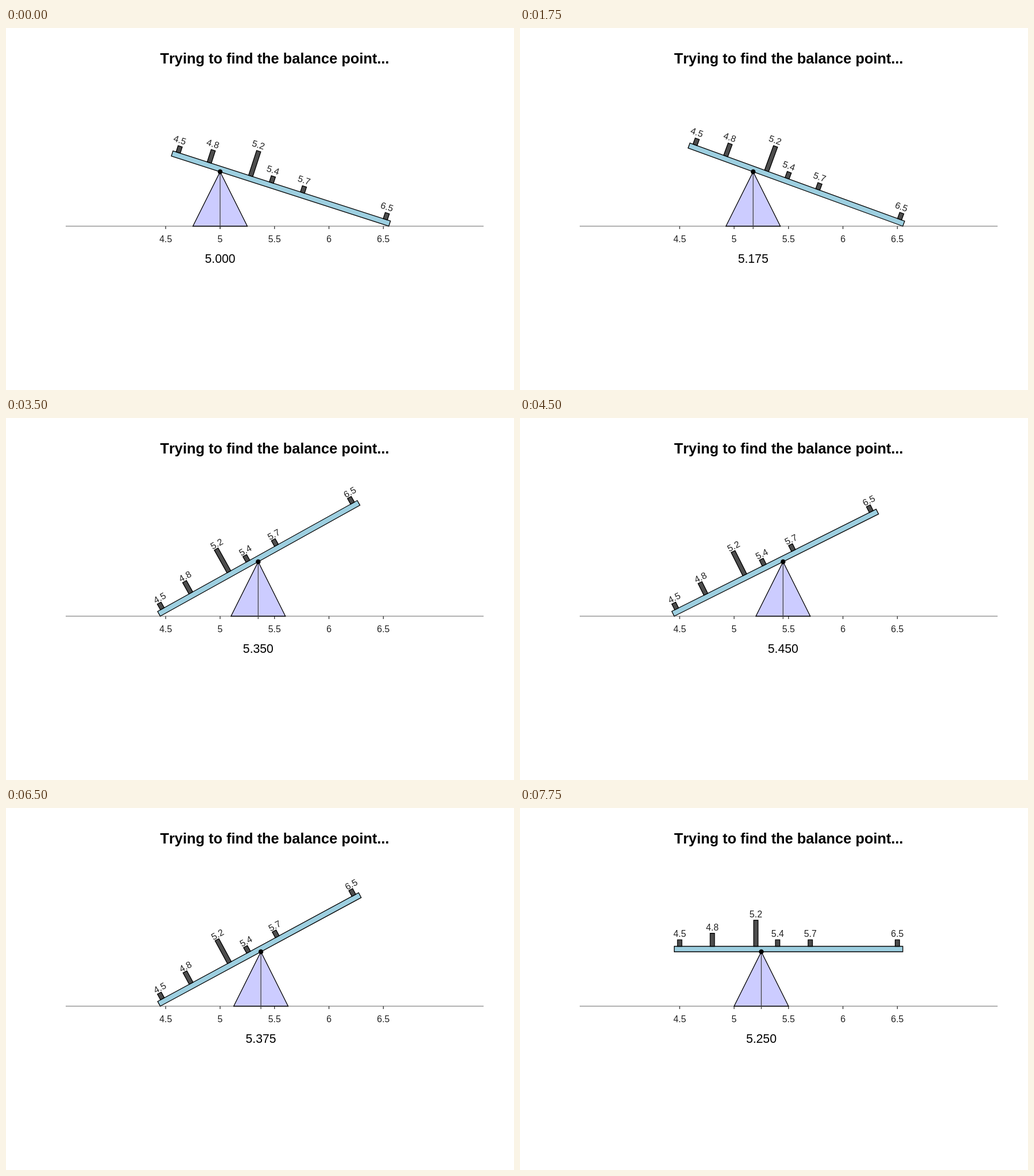
Animation, 885 px wide and 632 px high, one loop 8000 ms. Source, as an HTML page with a canvas:

```html
<!DOCTYPE html>
<html>
<head>
<meta charset="utf-8">
<style>
html, body { margin: 0; width: 100%; height: 100%; overflow: hidden; background: #fff; }
canvas { display: block; }
</style>
</head>
<body>
<canvas id="stage" width="885" height="632"></canvas>
<script>
const ctx = document.getElementById('stage').getContext('2d');
const UNIT = 189.6, GROUND = 346, APEX = 251, MEAN = 5.25;
const LEFT = 4.45, RIGHT = 6.55, THICK = 0.05 * UNIT;
const weights = [[4.5, 1], [4.8, 2], [5.2, 4], [5.4, 1], [5.7, 1], [6.5, 1]];
const STEP = 250, LOOP = 8000;
const px = v => 373 + (v - 5) * UNIT;

function text(str, x, y, size, color = '#000', weight = '') {
  ctx.font = `${weight} ${size}px "Liberation Sans", Arial, sans-serif`;
  ctx.fillStyle = color;
  ctx.fillText(str, x, y);
}

function shape(points, fill) {
  ctx.beginPath();
  points.forEach(p => ctx.lineTo(...p));
  ctx.closePath();
  ctx.fillStyle = fill;
  ctx.fill();
  ctx.strokeStyle = '#000';
  ctx.stroke();
}

function line(x1, y1, x2, y2, color) {
  ctx.beginPath();
  ctx.moveTo(x1, y1);
  ctx.lineTo(x2, y2);
  ctx.strokeStyle = color;
  ctx.stroke();
}

// The beam passes through the apex and rests with its heavy end on the ground.
function beamPose(pivot) {
  const side = Math.sign(Math.round((MEAN - pivot) * 1000));
  if (!side) return { end: pivot, y: APEX, angle: 0 };
  const end = side > 0 ? RIGHT : LEFT;
  return { end, y: GROUND, angle: Math.atan((GROUND - APEX) / ((end - pivot) * UNIT)) };
}

function drawBeam(pivot) {
  const { end, y, angle } = beamPose(pivot);
  const sin = Math.sin(angle), cos = Math.cos(angle);
  const at = (v, h) => {
    const d = (v - end) * UNIT;
    return [px(end) + d * cos + h * sin, y + d * sin - h * cos];
  };
  const bar = (a, b, low, high, fill) =>
    shape([at(a, low), at(b, low), at(b, high), at(a, high)], fill);

  bar(LEFT, RIGHT, 0, THICK, '#9dcfe0');
  for (const [v, count] of weights) {
    const top = THICK + count * 0.06 * UNIT;
    bar(v - 0.02, v + 0.02, THICK, top, '#4d4d4d');
    const [x, ty] = at(v, top);
    ctx.save();
    ctx.translate(x - 1.5 * sin, ty - 10.5 - 2.5 * sin);
    ctx.rotate(angle);
    text(v.toFixed(1), 0, 5.7, 15.9, '#222');
    ctx.restore();
  }
}

function draw(pivot) {
  ctx.fillStyle = '#fff';
  ctx.fillRect(0, 0, 885, 632);
  ctx.lineWidth = 1.33;
  ctx.textAlign = 'center';
  ctx.fontKerning = 'none';

  text('Trying to find the balance point...', 468, 61.8, 25.4, '#000', 'bold');
  line(104, GROUND, 832, GROUND, '#999');
  for (let v = 4.5; v <= 6.5; v += 0.5) {
    line(px(v), GROUND, px(v), GROUND + 5, '#333');
    text(String(v), px(v), 373.7, 15.9, '#222');
  }

  const x = px(pivot);
  shape([[x, APEX], [px(pivot + 0.25), GROUND], [px(pivot - 0.25), GROUND]], '#ccccff');
  drawBeam(pivot);
  line(x, APEX, x, GROUND + 5, '#444');
  ctx.beginPath();
  ctx.arc(x, APEX, 4.2, 0, 2 * Math.PI);
  ctx.fillStyle = '#000';
  ctx.fill();
  text(pivot.toFixed(3), x, 410, 21.2);
}

// Moves right for 20 steps, pauses one step, then moves back.
function frame(now) {
  const n = Math.floor(now % LOOP / STEP);
  const steps = n <= 20 ? n : 41 - n;
  draw((5000 + 25 * steps) / 1000);
  requestAnimationFrame(frame);
}
frame(0);
</script>
</body>
</html>
```
